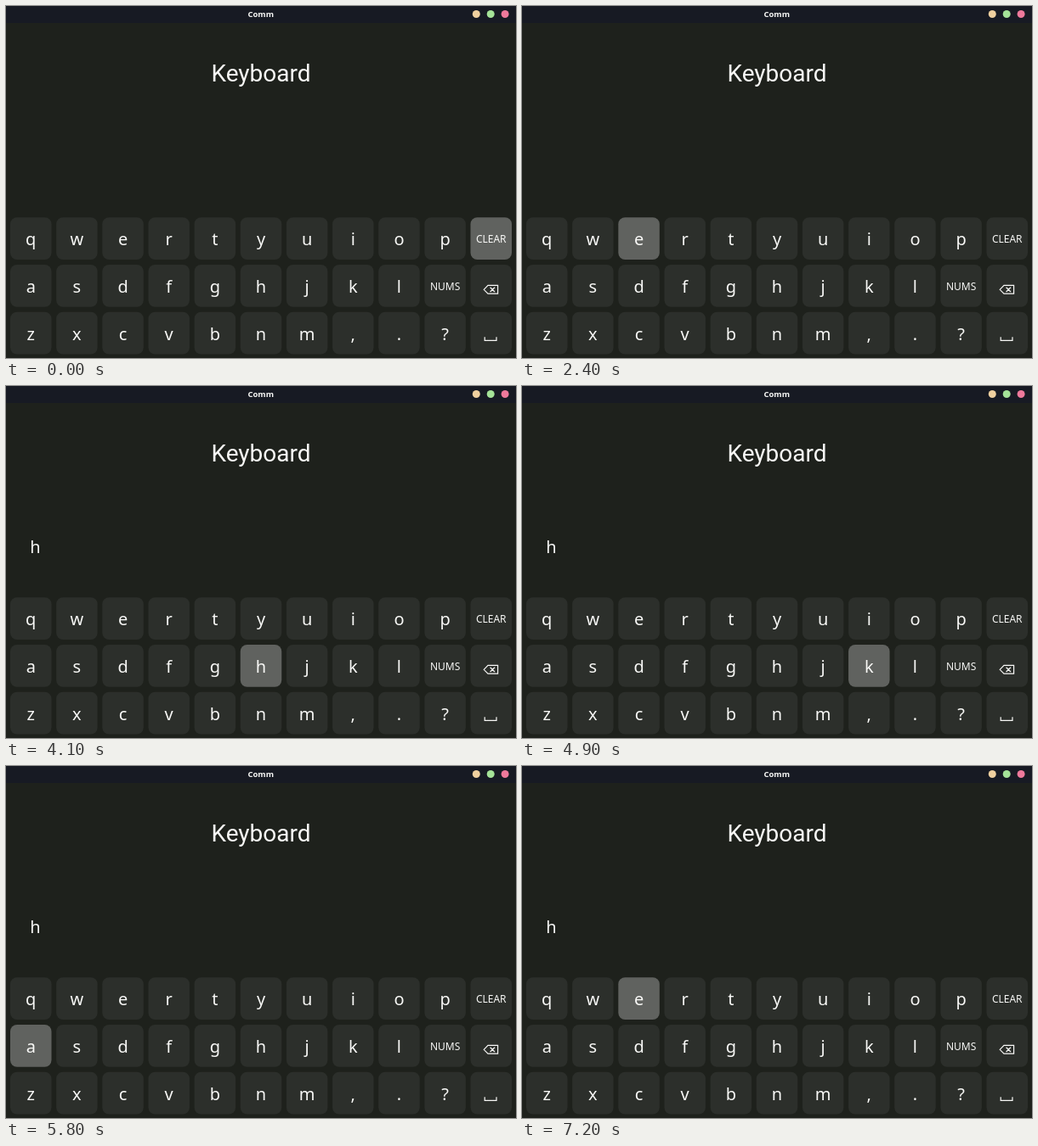
Animation of 600x415 px, one loop 8000 ms. Source, as an HTML page:

```html
<!DOCTYPE html>
<html lang="en">
<head>
<meta charset="utf-8">
<title>Keyboard</title>
<style>
  html, body { margin: 0; width: 100%; height: 100%; overflow: hidden; background: #1e211c; }
  svg { display: block; width: 100%; height: 100%; }
  text { fill: #f8f8f6; text-anchor: middle; font: 20px "Noto Sans", sans-serif; }
  .label { font-size: 12px; }
  .heading { font: 28px Roboto, sans-serif; }
  .caption { font-size: 9.5px; font-weight: 700; }
  .key { fill: #2c2f2b; }
  .key.active { fill: #60625f; }
  .icon { fill: none; stroke: #f8f8f6; stroke-width: 1.2; }
</style>
</head>
<body>
<svg id="stage" viewBox="0 0 600 415">
  <rect width="600" height="415" fill="#1e211c"/>
  <rect width="600" height="20" fill="#171a23"/>
  <text class="caption" x="299.7" y="13.3">Comm</text>
  <circle cx="553.3" cy="9.5" r="4.5" fill="#efd09f"/>
  <circle cx="570.2" cy="9.5" r="4.5" fill="#a5e398"/>
  <circle cx="587.1" cy="9.5" r="4.5" fill="#ee799b"/>
  <text class="heading" x="300" y="89">Keyboard</text>
  <text id="typed" x="28.2" y="197" style="text-anchor: start"></text>
</svg>
<script>
const LOOP = 8000;
const TYPE_AT = 4100;
const rows = [
  [..."qwertyuiop", "CLEAR"],
  [..."asdfghjkl", "NUMS", "back"],
  [..."zxcvbnm,.?", "space"]
];
const icons = {
  back: "M562.2 334.3 L567 329.4 H578.6 V339.2 H567 Z M569.6 331.7 L575 337 M575 331.7 L569.6 337",
  space: "M563.2 390.3 V394.3 H577 V390.3"
};
// Time at which the selection moves to each key.
const moves = [
  [0, "CLEAR"], [1500, "q"], [1900, "w"], [2400, "e"], [2600, "r"],
  [2900, "t"], [3200, "y"], [3600, "h"], [4700, "j"], [4900, "k"],
  [5200, "l"], [5400, "NUMS"], [5600, "back"], [5800, "a"],
  [6100, "s"], [6400, "d"], [6800, "c"], [7200, "e"]
];

const stage = document.getElementById("stage");
const typed = document.getElementById("typed");
const keys = {};

function add(tag, attributes, content = "") {
  const node = document.createElementNS("http://www.w3.org/2000/svg", tag);
  for (const name in attributes) node.setAttribute(name, attributes[name]);
  node.textContent = content;
  return stage.appendChild(node);
}

rows.forEach((row, r) => row.forEach((name, c) => {
  const x = 5 + c * 54.15;
  const y = 249.2 + r * 55.75;
  keys[name] = add("rect", { class: "key", x, y, width: 48.5, height: 49.8, rx: 8 });
  if (icons[name]) {
    add("path", { class: "icon", d: icons[name] });
  } else {
    const isLabel = name.length > 1;
    add("text", {
      class: isLabel ? "label" : "",
      x: x + 24.25,
      y: Math.round(y + (isLabel ? 29.7 : 32.8))
    }, name);
  }
}));

let active;
function draw(now) {
  const time = now % LOOP;
  const next = moves.findLast(([start]) => start <= time)[1];
  if (next !== active) {
    if (active) keys[active].classList.remove("active");
    keys[next].classList.add("active");
    active = next;
  }
  typed.textContent = time >= TYPE_AT ? "h" : "";
}

const startTime = performance.now();
function tick() {
  draw(performance.now() - startTime);
  requestAnimationFrame(tick);
}
tick();
</script>
</body>
</html>
```
